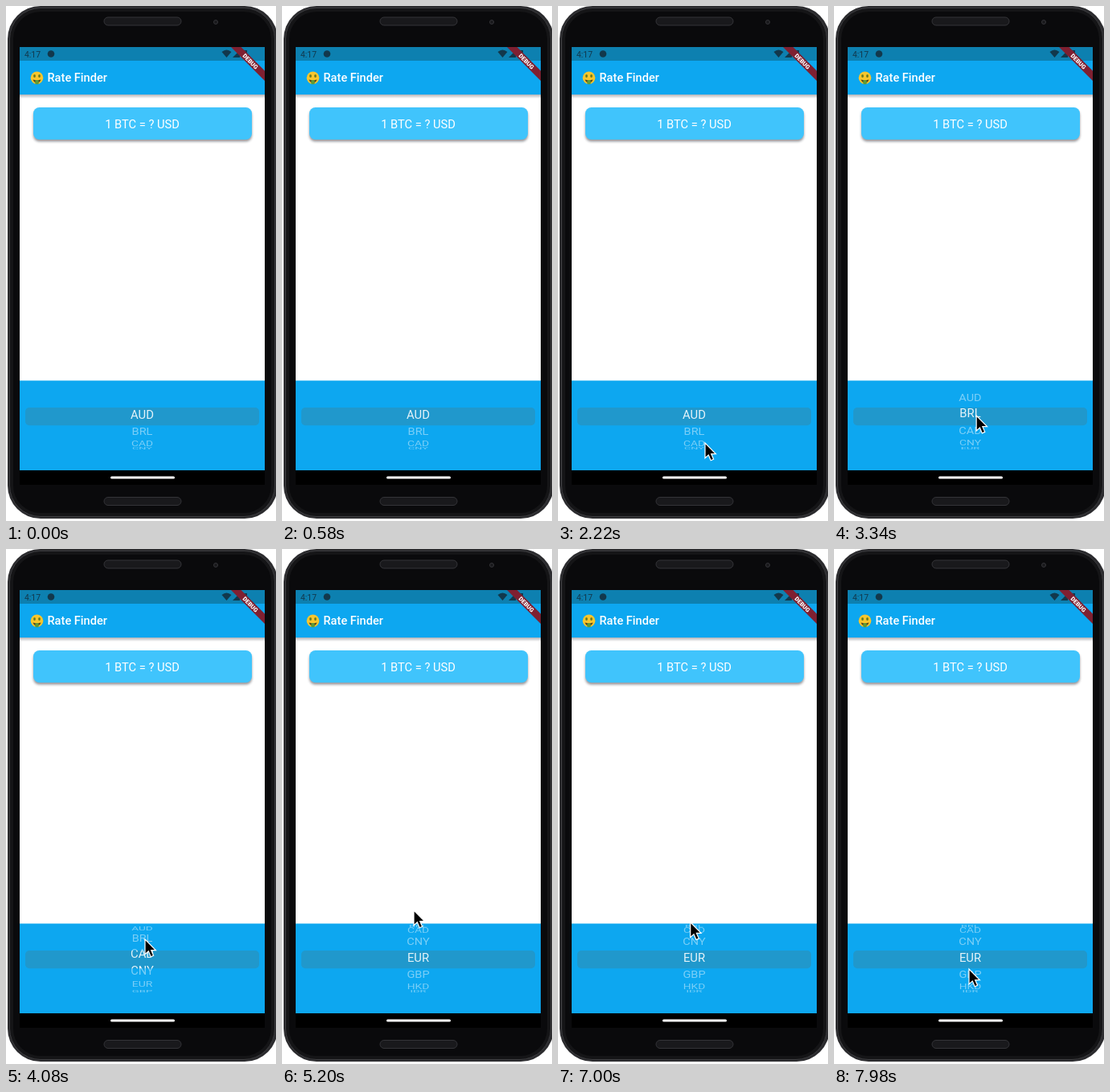
Recreate the animation shown at these times as an HTML page. Size 336 by 640 pixels, loop 8000 ms.

```html
<!DOCTYPE html>
<html lang="en">
<head>
<meta charset="utf-8">
<title>Rate Finder</title>
<style>
  html, body { margin: 0; width: 100%; height: 100%; overflow: hidden; background: #fff; }
  svg { display: block; width: 100%; height: 100%; font-family: Roboto, sans-serif; }
  .wheel { font-size: 14.84px; text-anchor: middle; fill: #fff; }
</style>
</head>
<body>
<svg viewBox="0 0 336 640">
  <defs>
    <linearGradient id="shade" x2="0" y2="1">
      <stop stop-color="#b4b4b8"/>
      <stop offset="1" stop-color="#fff"/>
    </linearGradient>
    <filter id="blur" x="-5%" y="-20%" width="110%" height="150%"><feGaussianBlur stdDeviation="1.6"/></filter>
    <clipPath id="screen"><path d="M17 51H322V577H17Z"/></clipPath>
    <clipPath id="band"><path d="M17 499H322V521.3H17Z"/></clipPath>
    <clipPath id="outside"><path d="M17 465.5H322V499H17ZM17 521.3H322V554.5H17Z"/></clipPath>
  </defs>

  <!-- Phone -->
  <rect x="2" y="0" width="336" height="637" rx="41" fill="#2b2b2e"/>
  <rect x="4.5" y="2.5" width="330" height="632" rx="38.5" fill="#151517" stroke="#3a3a3d"/>
  <rect x="9" y="7" width="321" height="623" rx="34" fill="#0a0a0c"/>
  <g fill="#19191c" stroke="#343438">
    <rect x="122" y="14" width="96" height="10" rx="5"/>
    <rect x="122" y="610.5" width="96" height="10" rx="5"/>
    <circle cx="261" cy="20" r="2.5"/>
  </g>
  <rect x="17" y="577" width="305" height="18" fill="#000"/>
  <rect x="130" y="584.5" width="80" height="3" rx="1.5" fill="#fff"/>

  <g clip-path="url(#screen)">
    <rect x="17" y="51" width="305" height="526" fill="#fff"/>
    <rect x="17" y="110" width="305" height="5" fill="url(#shade)"/>
    <rect x="17" y="51" width="305" height="59" fill="#0da7f0"/>
    <rect x="17" y="51" width="305" height="17" fill="#0d80b0"/>

    <!-- Status bar -->
    <g fill="#12384c">
      <text x="23" y="63.7" font-size="10.4">4:17</text>
      <circle cx="56" cy="59.5" r="4.3"/>
      <path d="M268.5 57Q274.5 52 280.5 57L274.5 64ZM282 64H291V55ZM295 55H300V64H295Z"/>
    </g>

    <!-- Title -->
    <circle cx="38.5" cy="89.3" r="7.8" fill="#f8c62c"/>
    <g fill="#6b7a1c">
      <ellipse cx="35.5" cy="87" rx="1.4" ry="2"/>
      <ellipse cx="41.5" cy="87" rx="1.4" ry="2"/>
    </g>
    <path d="M33.5 91.5Q38.5 93 43.5 91.5Q42 95.5 38.5 95.5T33.5 91.5Z" fill="#59401a"/>
    <rect x="36.3" y="92" width="4.4" height="5.2" rx="1" fill="#5d9b38"/>
    <text x="51.5" y="94.3" font-size="14.6" font-weight="500" fill="#fff">Rate Finder</text>

    <!-- Card -->
    <rect x="34" y="128.5" width="272" height="40" rx="7.5" fill="#606068" opacity=".65" filter="url(#blur)"/>
    <rect x="34" y="126" width="272" height="40" rx="7.5" fill="#40c4fc"/>
    <text x="169.6" y="151.7" font-size="14.7" text-anchor="middle" fill="#fff">1 BTC = ? USD</text>

    <!-- Picker -->
    <rect x="17" y="465.5" width="305" height="112" fill="#0da7f0"/>
    <rect x="24" y="499" width="291" height="22.3" rx="5" fill="#2098cc"/>
    <g class="wheel" clip-path="url(#outside)" opacity=".45"></g>
    <g class="wheel" clip-path="url(#band)" opacity=".88"></g>

    <!-- Corner ribbon -->
    <g transform="translate(322 51) rotate(45)">
      <rect x="-31" y="20.8" width="62" height="8.9" fill="#7f2031"/>
      <text y="27.9" font-size="7.4" font-weight="900" text-anchor="middle" fill="#fff">DEBUG</text>
    </g>
  </g>

  <path id="cursor" d="M0 0V18.8L4.3 14.9 7.2 21.8 10.6 20.3 7.7 13.6H13.4Z" fill="#000" stroke="#fff" stroke-width="1.2"/>
</svg>
<script>
const LOOP = 8000;
const CODES = 'AUD BRL CAD CNY EUR GBP HKD IDR ILS INR'.split(' ');
const RADIUS = 47.6, STEP = 0.455, DEPTH = 0.193;
const CENTER = { x: 169.5, y: 510.2 };

// [time, value...]: one slow drag, then a release that snaps to the nearest row
const POINTER = [
  [600, 342, 400], [1280, 257, 485], [2000, 183, 543], [2300, 183, 543],
  [4080, 173, 485], [5200, 164, 449], [6140, 163, 436], [6500, 163, 434],
  [7980, 168, 522]
];
const SCROLL = [
  [2650, 0], [4080, 2.22], [5200, 4], [6140, 4.32], [6500, 4.36], [6800, 4]
];

const cursor = document.getElementById('cursor');
const items = [...document.querySelectorAll('.wheel')].flatMap(wheel =>
  CODES.map((code, index) => {
    const node = document.createElementNS(wheel.namespaceURI, 'text');
    node.textContent = code;
    node.setAttribute('y', 2.5);
    wheel.append(node);
    return { node, index };
  }));

function sample(keys, t) {
  const next = keys.findIndex(key => key[0] > t);
  if (next === 0) return keys[0].slice(1);
  if (next < 0) return keys[keys.length - 1].slice(1);
  const a = keys[next - 1], b = keys[next];
  const k = (t - a[0]) / (b[0] - a[0]);
  return a.slice(1).map((value, i) => value + (b[i + 1] - value) * k);
}

// Each row sits on a cylinder seen in slight perspective.
function placeRow({ node, index }, scroll) {
  const angle = (index - scroll) * STEP;
  const visible = Math.abs(angle) < 1.45;
  node.style.display = visible ? '' : 'none';
  if (!visible) return;
  const scale = 1 / (1 + DEPTH * (1 - Math.cos(angle)));
  const y = CENTER.y + RADIUS * Math.sin(angle) * scale;
  node.setAttribute('transform',
    `translate(${CENTER.x} ${y}) scale(${scale} ${scale * Math.cos(angle)})`);
}

function draw(now) {
  const t = now % LOOP;
  const [scroll] = sample(SCROLL, t);
  items.forEach(item => placeRow(item, scroll));
  const [x, y] = sample(POINTER, t);
  cursor.setAttribute('transform', `translate(${x} ${y})`);
  requestAnimationFrame(draw);
}
draw(0);
</script>
</body>
</html>
```
